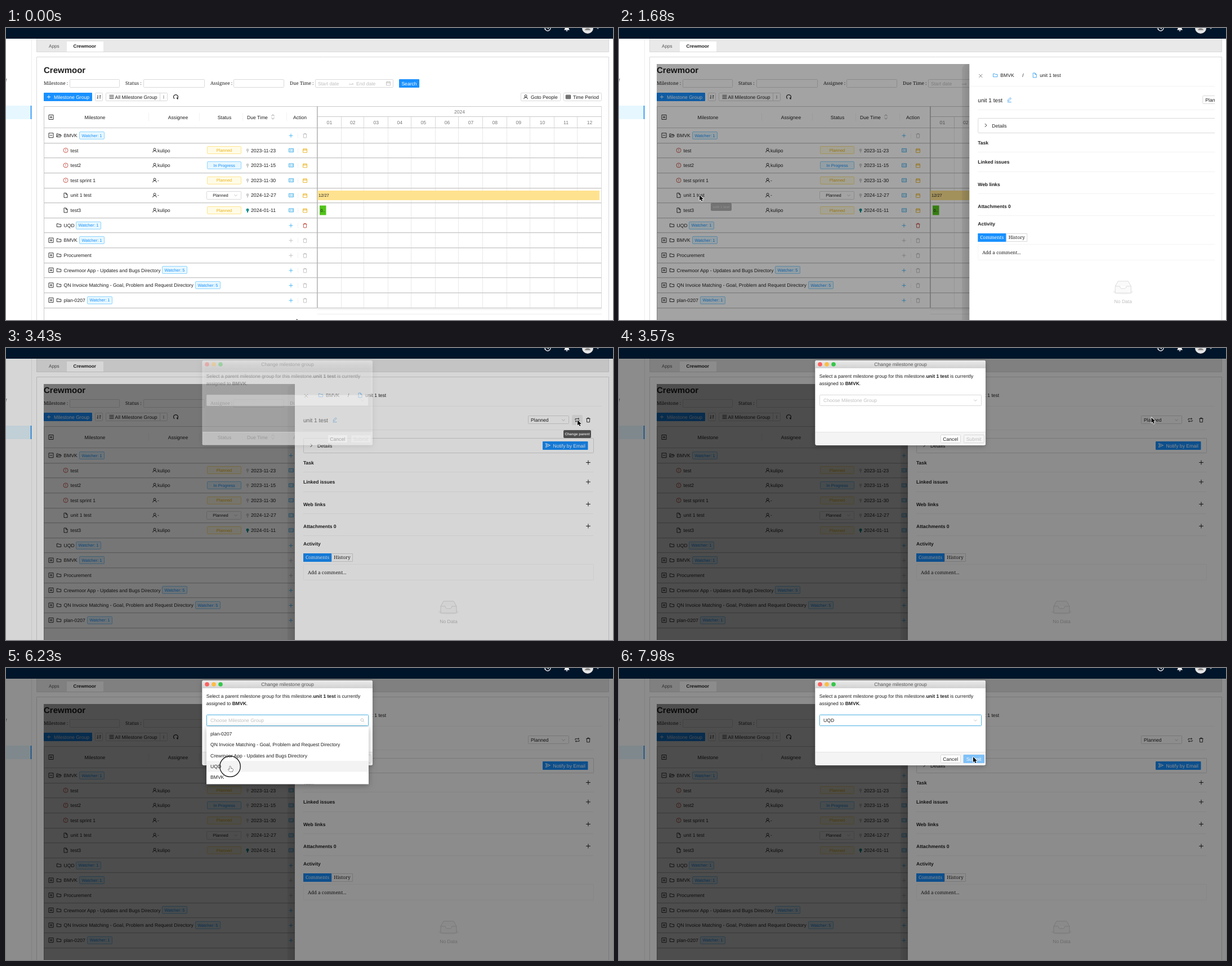
An HTML page with a canvas for the animation above (8 s loop, 1078 by 519 pixels).

```html
<!DOCTYPE html>
<html lang="en">
<head>
<meta charset="utf-8">
<title>Change milestone group</title>
<style>
html, body { margin: 0; width: 100%; height: 100%; overflow: hidden; background: #fff; }
canvas { display: block; }
</style>
</head>
<body>
<canvas id="stage" width="1078" height="519"></canvas>
<script>
const ctx = document.getElementById('stage').getContext('2d');
ctx.textRendering = 'geometricPrecision';
const W = 1078, H = 519, LOOP = 8000, SIZE = 8.6;
const SANS = '"Liberation Sans", Arial, sans-serif', SERIF = '"Noto Serif", serif';
const BLUE = '#1890ff', INK = '#1f1f1f', LINE = '#d9d9d9', FAINT = '#f2f2f2', PALE = '#bfbfbf';

const APP = 'Crewmoor', GROUP = 'BMVK', TARGET = 'UQD', PERSON = 'kulipo', ITEM = 'unit 1 test';
const APP_LIST = APP + ' App - Updates and Bugs Directory';
const TASK_LIST = 'QN Invoice Matching - Goal, Problem and Request Directory';
const PLAN = 'plan-0207';

const ICON = {
  plus: 'M-3.5 0h7M0-3.5v7',
  boxPlus: 'M-4-4h8v8h-8zM-2.2 0h4.4M0-2.2v4.4',
  boxMinus: 'M-4-4h8v8h-8zM-2.2 0h4.4',
  folder: 'M-3.7-2.7h2.7l1 1.1h3.7v4.4h-7.4z',
  folderOpen: 'M-4 2.8v-5.6h2.6l1 1.1h3.2v1.6M-4 2.8l1.5-2.9h6.8l-1.5 2.9z',
  file: 'M-3-4h3.7l2.3 2.3v5.7h-6zM.5-4v2.5h2.5',
  warn: 'M-4 0a4 4 0 108 0a4 4 0 10-8 0M0-2.2v2.6M0 1.5v.9',
  person: 'M-2-1.7a2 2 0 104 0a2 2 0 10-4 0M-3.3 3.8a3.3 3.3 0 016.6 0',
  trash: 'M-3.5-2.5h7M-1.4-2.6v-1.2h2.8v1.2M-2.7-2.4l.3 6.2h4.8l.3-6.2',
  calendar: 'M-3.5-2.8h7v6.2h-7zM-3.5-.8h7M-1.7-4v2M1.7-4v2',
  card: 'M-4-3h8v6h-8zM-2.5-1h2M-2.5 1h2M.8-1h2M.8 1h2',
  chevron: 'M-2.6-1.3L0 1.5L2.6-1.3',
  right: 'M-1.4-3L1.6 0L-1.4 3',
  close: 'M-3-3L3 3M-3 3L3-3',
  search: 'M-3-.6a2.4 2.4 0 104.8 0a2.4 2.4 0 10-4.8 0M1.2 1.2L3 3',
  sort: 'M-2-3.2v6.2l-1.5-1.6M2 3.2v-6.2l1.5 1.6',
  list: 'M-4-2.8h8M-4 0h8M-4 2.8h8',
  dots: 'M0-2.6v.9M0-.4v.9M0 1.8v.9',
  reload: 'M-2.3 3.3a4 4 0 114.6 0M2.3 3.3v-2.2M2.3 3.3h2',
  arrow: 'M-4 1h8l-2-2',
  table: 'M-4-3.2h8v6.4h-8zM-4-1h8M-4 1h8M-1.4-3.2v6.4M1.4-3.2v6.4',
  swap: 'M-3.5 0v-2.2h6.5M1.6-3.6l1.6 1.4l-1.6 1.4M3.5 0v2.2h-6.5M-1.6 3.6l-1.6-1.4l1.6-1.4',
  edit: 'M-2.8 1.8l.3-2l4-4l1.6 1.6l-4 4zM-3.5 3.7h7',
  send: 'M-4-3.5L4 0L-4 3.5L-2.7 0zM-2.7 0h3',
  clock: 'M-4.6 2a5 5 0 109.2-4M0-2.5v3l2.2 1.2M-6 .5l1.3 1.7l1.8-1.2',
};

const clamp = v => Math.max(0, Math.min(1, v));
const ramp = (t, from, to) => clamp((t - from) / (to - from));
const smooth = p => p * p * (3 - 2 * p);

function text(s, x, y, color = INK, size = SIZE, { bold, serif, align = 'left' } = {}) {
  ctx.font = `${bold ? 'bold ' : ''}${size}px ${serif ? SERIF : SANS}`;
  ctx.textAlign = align;
  ctx.fillStyle = color;
  ctx.fillText(s, x, y + size * 0.36);
  return ctx.measureText(s).width;
}
const center = (s, x, y, color, size, opt) => text(s, x, y, color, size, { ...opt, align: 'center' });
function fill(x, y, w, h, color) { ctx.fillStyle = color; ctx.fillRect(x, y, w, h); }
function box(x, y, w, h, bg, border, r = 1) {
  const inset = border ? .5 : 0;
  ctx.beginPath();
  ctx.roundRect(x + inset, y + inset, w - 2 * inset, h - 2 * inset, r);
  if (bg) { ctx.fillStyle = bg; ctx.fill(); }
  if (border) { ctx.strokeStyle = border; ctx.lineWidth = 1; ctx.stroke(); }
}
function dot(x, y, r, color) {
  ctx.beginPath(); ctx.arc(x, y, r, 0, 7); ctx.fillStyle = color; ctx.fill();
}
function icon(name, x, y, color = INK, width = .9, scale = 1) {
  ctx.save();
  ctx.translate(x, y); ctx.scale(scale, scale);
  ctx.strokeStyle = color; ctx.lineWidth = width;
  ctx.stroke(new Path2D(ICON[name]));
  ctx.restore();
}
function withShadow(color, blur, dx, dy, draw) {
  ctx.save();
  Object.assign(ctx, { shadowColor: color, shadowBlur: blur, shadowOffsetX: dx, shadowOffsetY: dy });
  draw();
  ctx.restore();
}
function tag(s, x, y, w, kind) {
  const [bg, border, color] = kind === 'gold' ? ['#fffbe6', '#ffe58f', '#eab41c'] : ['#e6f7ff', '#91d5ff', BLUE];
  box(x, Math.round(y - 7), w, 14, bg, border, 1.5);
  center(s, x + w / 2, y, color, 7.5);
}
function tooltip(s, x, y, w, alpha) {
  ctx.globalAlpha = alpha;
  box(x, y, w, 14, '#5c5c5c', null, 2);
  center(s, x + w / 2, y + 7, '#fff', 6.3, { bold: true });
  ctx.globalAlpha = 1;
}

function header() {
  fill(0, 0, W, 19, '#001529');
  icon('clock', 962, 0, '#fff', 1.2);
  ctx.fillStyle = '#fff';
  ctx.fill(new Path2D('M991 3.5h10l-1.5-2v-5h-7v5zM994.5 4.2h3a1.5 1.5 0 01-3 0z'));
  dot(1033, 0, 10, '#e4e4e4');
  ctx.fillStyle = '#8a8a8a';
  ctx.fill(new Path2D('M1028 4a5 3.5 0 0110 0z'));
  icon('chevron', 1051, 0, '#fff');
}

function frame() {
  fill(0, 0, W, H, '#fff');
  fill(45, 19, 1, 500, '#ececec');
  fill(0, 138, 45, 24, '#e6f7ff');
  fill(43.7, 138, 1.6, 24, BLUE);
  text('r', -1, 92);
  box(54, 18, 1017, 25, '#e9e9e9', LINE, 0);
  fill(108, 24, 65, 18, '#fff');
  text('Apps', 76, 32.5, '#555', 8.2);
  text(APP, 119.5, 32.5, INK, 8.2, { bold: true });
  box(54, 51, 1017, 480, '#fff', LINE, 0);
}

function filters() {
  text(APP, 67, 74.5, INK, 15, { bold: true });
  const label = { serif: true };
  [['Milestone :', 67, 113, 89], ['Status :', 212, 244, 109], ['Assignee :', 363, 404, 90], ['Due Time :', 504, 549, 139]]
    .forEach(([s, x, bx, w]) => {
      text(s, x, 98.5, INK, 8.3, label);
      box(bx, 91, w, 15, '#fff', LINE);
    });
  text('Start date', 554, 98.5, PALE);
  icon('arrow', 613, 99, PALE);
  text('End date', 622, 98.5, PALE);
  icon('calendar', 679, 98.5, PALE);
  box(698, 91, 36, 15, BLUE);
  center('Search', 716, 98.5, '#fff');

  box(67, 115, 86, 15, BLUE);
  icon('plus', 76, 122.5, '#fff', 1, .9);
  text('Milestone Group', 85, 122.5, '#fff');
  box(158, 115, 14, 15, '#fff', LINE);
  icon('sort', 165, 122.5);
  box(177, 115, 110, 15, '#fff', LINE);
  fill(273, 115, 1, 15, LINE);
  icon('list', 187.5, 122.5, INK, 1);
  text('All Milestone Group', 193.5, 122.5);
  icon('dots', 280, 122.5, INK, 1.1);
  icon('reload', 301.5, 122.5, INK, 1.2);
  box(914, 115, 71, 15, '#fff', LINE);
  icon('person', 923, 122.5);
  text('Goto People', 932, 122.5);
  box(990, 115, 68, 15, '#fff', LINE);
  icon('table', 998.5, 122.5);
  text('Time Period', 1007, 122.5);
}

const rowY = i => 190.8 + i * 26.63;

function groupRow(i, name, watchers, { mark = 'boxPlus', folder = 'folder', plus = '#40b4f5', bin = PALE } = {}) {
  const y = rowY(i);
  if (mark) icon(mark, 80, y);
  icon(folder, 94, y);
  const w = text(name, 102.5, y);
  if (watchers) tag('Watcher: ' + watchers, Math.round(105.3 + w), y, 45);
  icon('plus', 506, y + .5, plus, .9);
  icon('trash', 531, y + .5, bin);
}
function itemRow(i, mark, name, who, status, due, pin = '#cfcfcf') {
  const y = rowY(i);
  icon(mark, 106, y, mark === 'warn' ? '#c2483c' : INK);
  text(name, 114.5, y);
  icon('person', 264, y);
  text(who, 269, y);
  if (status === 'select') {
    box(356, Math.round(y - 7.3), 62, 15, '#fff', LINE);
    center('Planned', 381, y, INK, 7.5);
    icon('chevron', 408, y, PALE);
  } else tag(status, 357, y, 61, status === 'Planned' ? 'gold' : 'blue');
  dot(429, y - .8, 2.5, pin);
  fill(428, y + 1, 2, 3, pin);
  text(due, 435, y, INK, 8.75);
  icon('card', 506.5, y, '#2fa8e8');
  icon('calendar', 531, y + .5, '#e8b21c');
}

function table() {
  const rule = '#c9c9c9';
  icon('boxPlus', 80, 158.5);
  [['Milestone', 158], ['Assignee', 305.5], ['Status', 388], ['Due Time', 446.5], ['Action', 522]]
    .forEach(([s, x]) => center(s, x, 158.5));
  icon('chevron', 474, 160.5, PALE, 1.2);
  icon('chevron', 474, 155.5, PALE, 1.2, -1);
  [253, 343, 420, 498].forEach(x => fill(x, 151, 1, 14, FAINT));

  let x = 553;
  center('2024', 805.5, 148.5, '#777');
  for (let m = 1; m <= 12; m++) {
    const w = new Date(2024, m, 0).getDate() * 505 / 366;
    center(String(m).padStart(2, '0'), x + w / 2, 167.5, '#777');
    x += w;
    fill(Math.round(x) - 1, 158, 1, 20, LINE);
    fill(Math.round(x) - 1, 178, 1, 319, '#e9e9e9');
  }
  fill(67, 139, 991, 1, rule);
  fill(553, 157, 505, 1, rule);
  for (let i = 0; i <= 12; i++) fill(67, Math.round(177 + i * 26.63), 991, i ? 1.4 : 1, rule);
  fill(67, 139, 1, 380, rule);
  fill(552, 139, 1.6, 358, '#b5b5b5');
  fill(1057, 139, 1, 358, LINE);
  fill(553, 500, 505, 1, '#ececec');
  fill(553, 508, 505, 1, '#ececec');
  for (let i = 0; i < 12; i++) fill(518, rowY(i) - 4, 1, 9, FAINT);

  groupRow(0, GROUP, 1, { mark: 'boxMinus', folder: 'folderOpen' });
  itemRow(1, 'warn', 'test', PERSON, 'Planned', '2023-11-23');
  itemRow(2, 'warn', 'test2', PERSON, 'In Progress', '2023-11-15');
  itemRow(3, 'warn', 'test sprint 1', '-', 'Planned', '2023-11-30');
  itemRow(4, 'file', ITEM, '-', 'select', '2024-12-27');
  itemRow(5, 'file', 'test3', PERSON, 'Planned', '2024-01-11', '#12908e');
  groupRow(6, TARGET, 1, { mark: null, bin: '#c2483c' });
  groupRow(7, GROUP, 1, { plus: PALE });
  groupRow(8, 'Procurement', 0, { plus: PALE });
  groupRow(9, APP_LIST, 5);
  groupRow(10, TASK_LIST, 5);
  groupRow(11, PLAN, 1);

  fill(553, 289, 501, 17, '#ffe28f');
  text('12/27', 555, 297.5, INK, 7.5);
  fill(557, 315.5, 11.5, 17, '#52c41a');
  text('0..', 558.5, 324, INK, 7.5);
}

function drawer(t) {
  if (t < 1530) return;
  const p = ramp(t, 1540, 1880), slide = 1 - (1 - p) ** 3;
  ctx.save();
  ctx.beginPath(); ctx.rect(67, 64, 991, 455); ctx.clip();
  fill(67, 64, 991, 455, `rgba(0,0,0,${.45 * slide})`);
  ctx.translate(545 * (1 - slide), 0);
  box(500, 64, 40, 480, 'rgba(0,0,0,.06)', null, 10);
  withShadow('rgba(0,0,0,.15)', 14, -3, 0, () => fill(513, 64, 545, 470, '#fff'));
  icon('close', 533, 85, '#777');
  icon('folder', 559, 84, '#3aa0f0');
  text(GROUP, 568, 84);
  text('/', 607, 84);
  icon('file', 629, 84, '#3aa0f0');
  text(ITEM, 638, 84);
  [103, 145, 220, 255, 294, 333].forEach((y, i) => fill(i ? 528 : 513, y, i ? 515 : 545, 1, FAINT));
  text(ITEM, 528, 128, INK, 10.1);
  icon('edit', 584, 128, '#3aa0f0');
  box(927, 120, 73, 15, '#fff', LINE);
  text('Planned', 932, 128);
  icon('chevron', 990, 128, PALE);
  if (t > 2450 && t < 3500) box(1005, 119, 19, 18, '#eee', null, 2);
  icon('swap', 1014.5, 128);
  icon('trash', 1034, 128);
  box(528, 160, 516, 27, '#fff', LINE);
  icon('right', 542, 173);
  text('Details', 553, 173.5);
  box(953, 166, 80.5, 15, BLUE);
  icon('send', 962.5, 173, '#fff');
  text('Notify by Email', 971.5, 173.5, '#fff');
  [['Task', 203.5], ['Linked issues', 238], ['Web links', 277.5], ['Attachments 0', 316.5], ['Activity', 348]]
    .forEach(([s, y], i) => {
      text(s, 528, y, INK, 8.5, { bold: true });
      if (i < 4) icon('plus', 1034, y, INK, .9, 1.1);
    });
  box(578, 365, 38, 15, '#fff', LINE, 0);
  fill(528, 365, 50, 15, BLUE);
  center('Comments', 553, 372.5, '#fff', 8.3, { serif: true });
  center('History', 597, 372.5, INK, 8.3, { serif: true });
  box(528, 384, 516, 29, '#fff', '#f4f4f4');
  text('Add a comment...', 536, 399, INK, 8.3, { serif: true });
  ctx.beginPath(); ctx.ellipse(786, 469, 18, 4.5, 0, 0, 7); ctx.fillStyle = '#f5f5f5'; ctx.fill();
  ctx.fillStyle = '#fafafa'; ctx.strokeStyle = LINE; ctx.lineWidth = .9;
  const tray = new Path2D('M772 459l5-9h18l5 9v12h-28zM772 459h8q1 4 3 4h6q2 0 3-4h8');
  ctx.fill(tray); ctx.stroke(tray);
  center('No Data', 786, 485.5, PALE);
  ctx.restore();
}

function modal(t, y) {
  const show = ramp(t, 3360, 3560);
  if (!show) return;
  fill(0, 19, W, 500, `rgba(0,0,0,${.45 * show})`);
  ctx.globalAlpha = show;
  withShadow('rgba(0,0,0,.25)', 8, 0, 2, () => box(348.3, 22, 302.7, 151, '#fff', null, 3));
  const bar = ctx.createLinearGradient(0, 22, 0, 36);
  bar.addColorStop(0, '#ebebeb'); bar.addColorStop(1, '#d2d2d2');
  box(348.3, 22, 302.7, 14, bar, null, [3, 3, 0, 0]);
  ['#fc605c', '#fdbc40', '#34c749'].forEach((c, i) => dot(357 + 12 * i, 29, 3.8, c));
  center('Change milestone group', 500, 29, '#555');
  const body = 8.54;
  let x = 355.7;
  x += text('Select a parent milestone group for this milestone.', x, 50.3, INK, body);
  x += text(ITEM, x, 50.3, INK, body, { bold: true });
  text(' is currently', x, 50.3, INK, body);
  x = 355.7 + text('assigned to ', 355.7, 63.4, INK, body);
  x += text(GROUP, x, 63.4, INK, body, { bold: true });
  text('.', x, 63.4, INK, body);

  const chosen = t >= 6370, open = ramp(t, 4690, 4850) * (1 - ramp(t, 6370, 6550));
  if (t > 4620) box(355, 82, 290, 22, null, 'rgba(24,144,255,.14)', 2);
  box(356, 83, 288, 20, '#fff', t > 4130 ? '#63bde2' : LINE, 1);
  text(chosen ? TARGET : 'Choose Milestone Group', 363, 93, chosen ? INK : PALE);
  icon(open ? 'search' : 'chevron', 633, 93, PALE);

  fill(349, 149, 302, 23, '#f4f4f4');
  fill(349, 149, 302, 1, '#e4e4e4');
  box(571, 154, 36, 15, '#fff', LINE);
  center('Cancel', 588.7, 161.5);
  box(612, 154, 37, 15, '#f5f5f5', LINE);
  center('Submit', 630, 161.5, PALE);
  const enabled = ramp(t, 6400, 6700);
  if (enabled) {
    ctx.globalAlpha = enabled;
    box(611.5, 154, 37.5, 15, t >= 7910 ? '#7fc1f8' : BLUE);
    center('Submit', 630, 161.5, '#fff');
  }
  if (open) {
    ctx.save();
    ctx.globalAlpha = open;
    ctx.translate(0, 105 * .2 * (1 - open)); ctx.scale(1, .8 + .2 * open);
    withShadow('rgba(0,0,0,.3)', 10, 0, 2, () => fill(356, 105, 288, 101.5, '#fff'));
    const active = y < 107 ? 0 : Math.min(4, Math.floor((y - 107) / 19.3));
    fill(356, 107.3 + active * 19.3, 288, 19.3, '#f3f3f3');
    [PLAN, TASK_LIST, APP_LIST, TARGET, GROUP].forEach((s, i) => text(s, 363, 117 + i * 19.35));
    ctx.restore();
  }
  ctx.globalAlpha = 1;
}

// Pointer stops: time, x, y
const STOPS = [
  [70, 516, 517], [700, 143, 297], [1850, 143, 297], [2520, 1018, 128], [2730, 1018, 128],
  [2870, 1015, 128], [3430, 1015, 128], [4060, 471, 92], [5110, 471, 92], [5670, 398, 175],
  [7070, 398, 175], [7840, 629, 158],
];
const CLICKS = [1330, 3290, 4620, 6230];

function pointerAt(t) {
  const next = STOPS.findIndex(s => s[0] > t);
  if (next < 1) return (next ? STOPS.at(-1) : STOPS[0]).slice(1);
  const a = STOPS[next - 1], b = STOPS[next], p = smooth(ramp(t, a[0], b[0]));
  return [a[1] + (b[1] - a[1]) * p, a[2] + (b[2] - a[2]) * p];
}
const ARROW = new Path2D('M0 0v9.5l2.2-2l1.6 3.6l1.7-.8l-1.6-3.4h3z');
const HAND = new Path2D('M-.8 0q.9-1 1.7 0v3.2l3 .7q1.3.4 1.1 1.7l-.7 3.8h-4.6l-3-3.7q0-1.3 1.4-.8l1.1.9z');
function pointer(t, x, y) {
  if (CLICKS.some(c => t >= c && t < c + 140)) {
    ctx.beginPath(); ctx.arc(x, y, 18.3, 0, 7);
    ctx.strokeStyle = '#111'; ctx.lineWidth = 1.3; ctx.stroke();
  }
  const hand = (t > 2450 && t < 3360) || (t > 4060 && t < 6440);
  ctx.save();
  ctx.translate(x, y);
  ctx.lineJoin = 'round';
  ctx.lineWidth = hand ? 1 : 1.6;
  ctx.strokeStyle = hand ? '#111' : '#fff';
  ctx.fillStyle = hand ? '#fff' : '#000';
  ctx.stroke(hand ? HAND : ARROW);
  ctx.fill(hand ? HAND : ARROW);
  ctx.restore();
}

function draw(t) {
  const [x, y] = pointerAt(t);
  frame();
  header();
  filters();
  table();
  tooltip(ITEM, 163, 311, 37, ramp(t, 980, 1100) * (1 - ramp(t, 1600, 1750)));
  drawer(t);
  tooltip('Change parent', 990, 146, 49, ramp(t, 2800, 2940) * (1 - ramp(t, 3440, 3540)));
  modal(t, y);
  pointer(t, x, y);
}

const start = performance.now();
(function tick() {
  draw((performance.now() - start) % LOOP);
  requestAnimationFrame(tick);
})();
</script>
</body>
</html>
```
